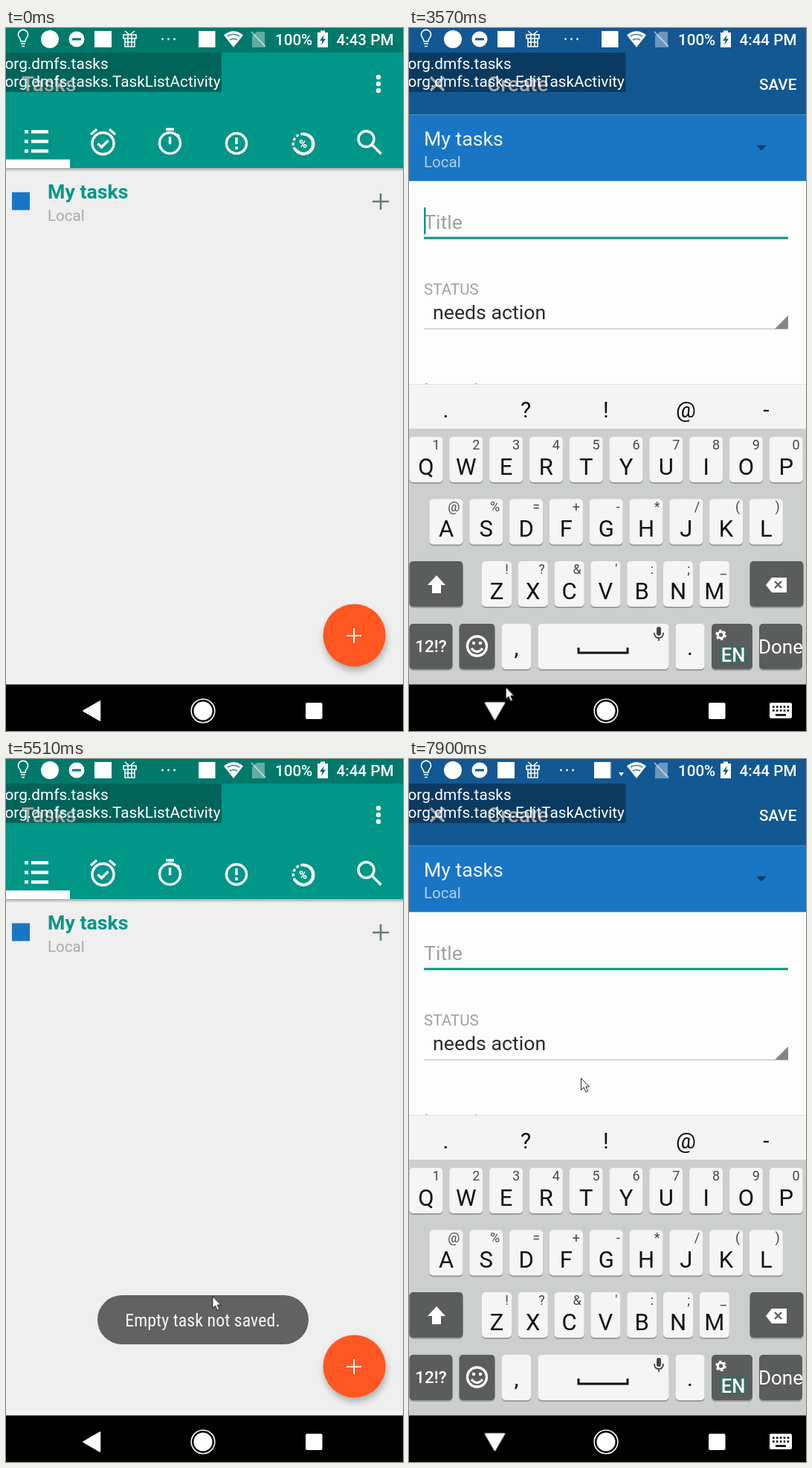
An HTML page for the animation above (8000 ms loop, 534 by 944 pixels).

```html
<!DOCTYPE html>
<html lang="en">
<head>
<meta charset="utf-8">
<title>Task list</title>
<style>
html, body { margin: 0; width: 100%; height: 100%; overflow: hidden; background: #000; }
svg { display: block; width: 534px; height: 944px; font-family: Roboto, sans-serif; }
text { white-space: pre; }
.s { font-size: 20.6px; }
.m { font-size: 26.7px; }
.h { font-size: 28px; font-weight: 500; }
.b { font-weight: 500; }
.w { fill: #fff; }
.grey { fill: #a0a0a0; }
.line { fill: none; stroke: #fff; stroke-width: 3.4; }
.thin { fill: none; stroke: #fff; stroke-width: 1.6; }
.mid { text-anchor: middle; }
.end { text-anchor: end; }

.anim, .step { animation: 8s linear infinite; }
.step { animation-timing-function: step-end; }
.cursor { animation-name: cursor; }
.create { animation-name: create; }
.keyboard { animation-name: keyboard; animation-timing-function: ease-out; }
.toast { animation-name: toast; }
.caret { animation-name: caret; }
.typing { animation-name: typing; }
.back { animation-name: back; transform-origin: 115.5px 917px; }
.editing { animation-name: editing; }
.listing { animation-name: listing; }
.before { animation-name: before; }
.after { animation-name: after; }
.data { animation-name: data; }
.dots { animation-name: dots; }
.tag { animation-name: tag; }

@keyframes cursor {
  0%, 4.5% { transform: translate(453px, 946px); }
  10.25%, 12.3% { transform: translate(452px, 909px); }
  14.25%, 40.7% { transform: translate(464px, 814px); }
  44.6% { transform: translate(130px, 884px); }
  46.3%, 50.5% { transform: translate(117px, 912px); }
  55.25% { transform: translate(481px, 118px); }
  57.4%, 61% { transform: translate(496px, 78px); }
  68.9% { transform: translate(277px, 722px); }
  69.75%, 70.75% { transform: translate(250px, 728px); }
  73% { transform: translate(153px, 756px); }
  76% { transform: translate(340px, 765px); }
  80.4%, 81.4% { transform: translate(424px, 800px); }
  86.25%, 92% { transform: translate(484px, 803px); }
  98.75%, 100% { transform: translate(231px, 428px); }
}
@keyframes create {
  0%, 27.1% { opacity: 0; transform: translateY(70px); }
  30.25%, 61% { opacity: 1; transform: none; }
  63.75%, 90.6% { opacity: 0; transform: translateY(70px); }
  93.5%, 100% { opacity: 1; transform: none; }
}
@keyframes keyboard {
  0%, 31.25% { transform: translateY(404px); }
  34.4%, 46.9% { transform: none; }
  49.4%, 93.75% { transform: translateY(404px); }
  96.9%, 100% { transform: none; }
}
@keyframes toast {
  0%, 63.75% { opacity: 0; }
  65.6%, 85.9% { opacity: 1; }
  88.9%, 100% { opacity: 0; }
}
@keyframes caret {
  0%, 47.5%, 60% { opacity: 0; }
  41.25%, 53.75% { opacity: 1; }
  100% { opacity: 0; }
}
@keyframes typing { 0%, 48% { opacity: 0; } 32%, 95%, 100% { opacity: 1; } }
@keyframes back { 0%, 48% { transform: none; } 32%, 95%, 100% { transform: rotate(-90deg); } }
@keyframes editing { 0%, 61% { opacity: 0; } 24%, 89.4%, 100% { opacity: 1; } }
@keyframes listing { 0%, 61% { opacity: 1; } 24%, 89.4%, 100% { opacity: 0; } }
@keyframes before { 0% { opacity: 1; } 24%, 100% { opacity: 0; } }
@keyframes after { 0% { opacity: 0; } 24%, 100% { opacity: 1; } }
@keyframes data { 0%, 31.25% { opacity: 0; } 19.4%, 91.25%, 100% { opacity: 1; } }
@keyframes dots { 0%, 31.25% { transform: none; } 19.4%, 91.25%, 100% { transform: translateX(-6px); } }
@keyframes tag { 0%, 31.25% { transform: none; } 19.4%, 91.25%, 100% { transform: translateX(-10.5px); } }
</style>
</head>
<body>
<svg viewBox="0 0 534 944">
  <defs>
    <linearGradient id="drop" x2="0" y2="1">
      <stop stop-opacity=".3"/><stop offset="1" stop-opacity="0"/>
    </linearGradient>
    <filter id="blur" x="-30%" y="-30%" width="160%" height="160%"><feGaussianBlur stdDeviation="5"/></filter>
    <filter id="soft"><feGaussianBlur stdDeviation="1"/></filter>
  </defs>

  <!-- Task list -->
  <g>
    <rect width="534" height="944" fill="#eeefee"/>
    <rect width="534" height="188" fill="#009688"/>
    <rect width="534" height="33" fill="#00796b"/>
    <rect y="188" width="534" height="5" fill="url(#drop)"/>
    <text class="h w" x="21" y="84.5">Tasks</text>
    <g class="w">
      <circle cx="501" cy="66" r="3.2"/><circle cx="501" cy="75" r="3.2"/><circle cx="501" cy="84" r="3.2"/>
      <rect y="176.500" width="86" height="11.500"/>
      <path d="M25 137h5v4.500h-5zm9 0h23v4.500H34zM25 150h5v4.500h-5zm9 0h23v4.500H34zM25 163h5v4.500h-5zm9 0h23v4.500H34z"/>
      <text class="mid" x="399.500" y="160.500" font-size="15" font-weight="900">%</text>
    </g>
    <g class="line">
      <circle cx="130.500" cy="155" r="14.500"/><path d="M123.500 155l5 5 9-9M114 143l8-7M139 136l8 7"/>
      <circle cx="220.500" cy="154.500" r="14"/><path d="M215 136h11M220.500 146v10M230 143l3 3"/>
      <circle cx="310" cy="155" r="13.500"/><path d="M310 147v9M310 159v4"/>
      <path d="M400 142.500a13.200 13.200 0 1 1-11 20" stroke-width="4"/>
      <circle cx="399.500" cy="155.500" r="13.200" stroke-dasharray="4 2.500"/>
      <circle cx="484.500" cy="149" r="10.500"/><path d="M492 156.500l12.500 12.500"/>
    </g>
    <rect x="8" y="220.500" width="24" height="24" fill="#1976c5"/>
    <text class="m" x="56" y="229" font-weight="700" fill="#009688">My tasks</text>
    <text class="s" x="56" y="259" fill="#a9adac">Local</text>
    <path d="M493 233h22M504 222v22" stroke="#6a7a77" stroke-width="2.600"/>
    <circle cx="470" cy="821" r="42" opacity=".28" filter="url(#blur)"/>
    <circle cx="468.500" cy="815.500" r="42" fill="#ff5722"/>
    <path d="M458 816h20M468 806v20" stroke="#fff" stroke-width="2"/>
  </g>

  <!-- Task editor -->
  <g class="anim create">
    <rect width="534" height="944" fill="#fdfdfd"/>
    <rect width="534" height="116.500" fill="#125892"/>
    <rect y="116.500" width="534" height="89" fill="#1976c5"/>
    <path class="line" d="M29 66l18 18M47 66l-18 18"/>
    <text class="h w" x="105" y="84.5">Create</text>
    <text class="s b w" x="471" y="83">SAVE</text>
    <text class="m" x="20" y="157.500" fill="#eef5fb">My tasks</text>
    <text class="s" x="20" y="187" fill="#b3cfe9">Local</text>
    <path d="M467 157.500h14l-7 7z" fill="#0d3d66"/>
    <g class="m grey">
      <text x="20" y="269.500">Title</text><text x="20" y="496">Location</text><text x="20" y="606">Description</text>
    </g>
    <rect x="20" y="280.500" width="490" height="3" fill="#009688"/>
    <rect class="step caret" x="20" y="241" width="2.500" height="36" fill="#009688"/>
    <text class="m" x="32" y="391" fill="#2b2b2b">needs action</text>
    <path d="M20 404h490" stroke="#ccc" stroke-width="1.400"/>
    <path d="M492 404l18-18v18z" fill="#858585"/>
    <path d="M20 507.500h490M20 617.500h490M68 755h442" stroke="#777" stroke-width="1.400"/>
    <rect x="25.500" y="722" width="24.500" height="24.500" rx="1" fill="none" stroke="#757575" stroke-width="3"/>
    <g fill="#dededd" filter="url(#soft)">
      <rect x="15" y="828" width="238" height="70"/><rect x="260" y="828" width="191" height="70"/>
    </g>
    <path d="M244 882l9-9v9zM441 882l9-9v9z" fill="#858585"/>
    <path d="M477 853l18 18M495 853l-18 18" stroke="#707070" stroke-width="2.600"/>
    <g class="s grey">
      <text x="20" y="358">STATUS</text><text x="20" y="694">CHECK LIST</text><text x="20" y="832">START</text>
    </g>
  </g>

  <g class="anim toast">
    <rect x="123" y="720" width="284" height="66" rx="33" fill="#626262"/>
    <text class="mid" x="264.500" y="762" font-size="24" fill="#f4f4f4" style="font-family:'Roboto Condensed',Roboto,sans-serif;font-stretch:75%">Empty task not saved.</text>
  </g>

  <g class="anim keyboard">
    <rect y="478" width="534" height="404" fill="#cdcfcf"/>
    <rect y="478" width="534" height="60" fill="#f3f4f3"/>
    <path d="M0 478.500h534" stroke="#e2e2e2"/>
    <g id="keys"></g>
    <path class="w" d="M37 735l12 13h-6v11H31v-11h-6z"/>
    <path class="w" d="M480 748l8-10h20v20h-20z"/>
    <path d="M492 743l9 9M501 743l-9 9" stroke="#5b5d5c" stroke-width="2.400"/>
    <g class="line"><circle cx="91.500" cy="830" r="13"/><path d="M84 833q7.500 9 15 0"/></g>
    <circle class="w" cx="87" cy="826" r="2.200"/><circle class="w" cx="96" cy="826" r="2.200"/>
    <path d="M228 832v7h66v-7" fill="none" stroke="#111" stroke-width="3"/>
    <rect x="333" y="804" width="6" height="12" rx="3" fill="#444"/>
    <path d="M330 812q0 7 6 7t6-7M336 819v4" fill="none" stroke="#444" stroke-width="1.800"/>
    <circle cx="419.500" cy="815" r="4.200" fill="none" stroke="#fff" stroke-width="3"/>
    <circle cx="419.500" cy="815" r="6.300" fill="none" stroke="#fff" stroke-width="2" stroke-dasharray="3.300"/>
  </g>

  <!-- Status bar -->
  <g class="w">
    <path class="thin" d="M20 18q0-3-2-5a6.500 6.500 0 1 1 10 0q-2 2-2 5zM20 21h6M21 24.500h4"/>
    <circle cx="59" cy="15" r="12"/>
    <path fill-rule="evenodd" d="M84.500 15a10.500 10.500 0 1 1 21 0a10.500 10.500 0 1 1-21 0zM89 13.500v3h12v-3z"/>
    <rect x="119" y="4" width="23" height="22"/>
    <path class="thin" d="M158 9h17v5h-17zM160 14v11h13V14M164 9v16M169 9v16M166 9l-6-5M167 9l6-5M160 19h13"/>
    <g class="step dots"><circle cx="210.500" cy="15" r="1.400"/><circle cx="218.500" cy="15" r="1.400"/><circle cx="226.500" cy="15" r="1.400"/></g>
    <rect class="step tag" x="259" y="4" width="22.500" height="22"/>
    <path class="step data" d="M282 18h7l-3.500 5z"/>
    <path d="M306 26L293 9.500q13-10.500 26 0z"/>
    <path d="M298 11q8-5 16 0M301 16q5-3 10 0" fill="none" stroke="#2e7d86" stroke-width="1.500"/>
    <path d="M331 11l6-6h11v21h-17z" opacity=".38"/>
    <path d="M330 5l19 20" stroke="#fff" stroke-opacity=".5" stroke-width="2"/>
    <path d="M419 6h4V3.500h6V6h4v20h-14z"/>
    <path d="M428 9l-6 8h3.500l-1.500 6 6-8.500h-3.500z" fill="#155f78"/>
    <g class="s b">
      <text x="362" y="22.500">100%</text>
      <text class="step before" x="444.500" y="22.500">4:43 PM</text>
      <text class="step after" x="444.500" y="22.500">4:44 PM</text>
    </g>
  </g>

  <!-- Activity overlay -->
  <rect y="33" width="290" height="53" opacity=".34"/>
  <rect class="step editing" x="290" y="33" width="1.500" height="53" fill="#000" fill-opacity=".34"/>
  <g class="w" font-size="20.750">
    <text x="-1.500" y="54.500">org.dmfs.tasks</text>
    <text class="step listing" x="-1.500" y="79">org.dmfs.tasks.TaskListActivity</text>
    <text class="step editing" x="-1.500" y="79">org.dmfs.tasks.EditTaskActivity</text>
  </g>

  <!-- Navigation bar -->
  <rect y="881.500" width="534" height="63"/>
  <g class="w">
    <path class="step back" d="M104 917l22.500-13v26z" stroke="#fff" stroke-width="1.500" stroke-linejoin="round"/>
    <circle cx="265" cy="917" r="12.500"/><circle class="thin" cx="265" cy="917" r="15.800"/>
    <rect x="403" y="906" width="22.500" height="22" rx="2"/>
    <g class="step typing">
      <rect x="485" y="906" width="30" height="21" rx="2"/>
      <path d="M489 911.500h23M489 916.500h23" stroke="#000" stroke-width="2.600" stroke-dasharray="2.600 2.300"/>
      <path d="M493 922.500h14" stroke="#000" stroke-width="2.600"/>
    </g>
  </g>

  <path class="anim cursor" d="M.5.500v16l3.700-3.500 2.700 6.300 2.700-1.200-2.700-6h4.600z" fill="#fff" stroke="#222" stroke-width="1"/>
</svg>
<script>
const DARK = '#5b5d5c', LIGHT = '#f4f5f4';

const label = (text, x, y, size, fill = '#111', extra = 'class="mid"') =>
  `<text x="${x}" y="${y}" font-size="${size}" fill="${fill}" ${extra}>${text}</text>`;

const key = (x, y, width, fill = LIGHT) =>
  `<rect x="${x}" y="${y + 2}" width="${width}" height="61" rx="5" fill="#9c9e9e"/>` +
  `<rect x="${x}" y="${y}" width="${width}" height="61" rx="5" fill="${fill}"/>`;

const row = (letters, hints, x, y, width, pitch) => [...letters].map((letter, i) => {
  const left = x + i * pitch;
  const hint = hints[i].replace('&', '&amp;');
  return key(left, y, width) + label(letter, left + width / 2, y + 50.5, 31) +
    label(hint, left + width - 4, y + 16.5, 18, '#484848', 'class="end"');
}).join('');

document.getElementById('keys').innerHTML = [
  ...[...'.?!@-'].map((c, i) => label(c, 49.5 + i * 107.7, 522.5, 30)),
  row('QWERTYUIOP', '1234567890', 0.5, 549, 45, 53.8),
  row('ASDFGHJKL', '@%=+-*/()', 27.5, 632.5, 45, 53.8),
  row('ZXCVBNM', "!?&':;_", 98, 716, 40, 48.8),
  key(0.5, 716, 72, DARK), key(458.5, 716, 72, DARK),
  key(0.5, 800, 58, DARK), key(67.5, 800, 48, DARK),
  key(125, 800, 39), key(173.5, 800, 176), key(358.5, 800, 39),
  key(407, 800, 55, DARK), key(471, 800, 58, DARK),
  label(',', 144.5, 842, 30), label('.', 378, 842, 30),
  label('12!?', 29.5, 838, 22.5, '#fff', 'class="mid b"'),
  '<rect x="417" y="829" width="38" height="24" fill="#3d6962"/>',
  label('EN', 436, 851, 25.5, '#fff', 'class="mid b"'),
  label('Done', 500, 840, 26, '#fff')
].join('');
</script>
</body>
</html>
```
